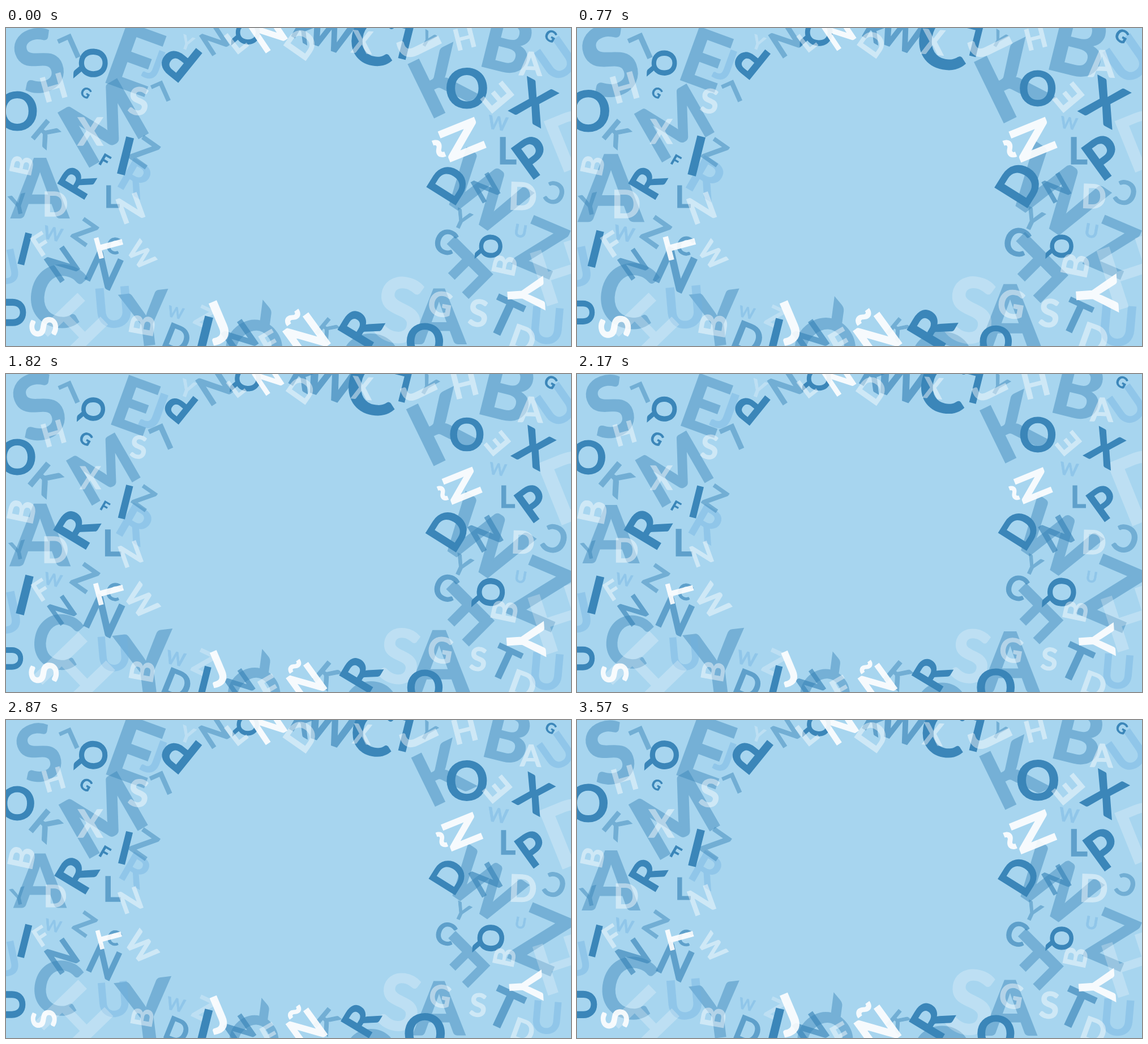
Animation, 998 px wide and 561 px high, one loop 3640 ms. Source, as an HTML page:

```html
<!DOCTYPE html>
<html lang="en">
<head>
<meta charset="utf-8">
<title>Breathing letters</title>
<style>
html, body { margin: 0; overflow: hidden; background: #a7d5ef; }
svg { display: block; width: 998px; height: 561px; }
text { font: 700 135.5px Lato, sans-serif; text-anchor: middle; stroke-width: 3px; }
</style>
</head>
<body>
<svg id="stage" viewBox="0 0 998 561"></svg>
<script>
const LOOP = 3640, STEP = 70, SWELL = 0.115;
const NAVY = '#3985b8', SKY = '#6fb1e2', WHITE = '#fff';
const stage = document.getElementById('stage');
const ruler = document.createElement('canvas').getContext('2d');
ruler.font = '700 135.5px Lato, sans-serif';
ruler.textAlign = 'center';
const letters = [];

// Horizontal shift that puts the middle of the inked shape at zero
function inkShift(char) {
  const { actualBoundingBoxLeft: left, actualBoundingBoxRight: right } = ruler.measureText(char);
  return (left - right) / 2;
}

// Row: letter, centre x, centre y, cap height, angle, time of largest size (% of the loop)
function layer(color, opacity, rows) {
  for (const [char, x, y, height, angle, peak] of rows) {
    const node = document.createElementNS('http://www.w3.org/2000/svg', 'text');
    node.textContent = char;
    const looks = { x: inkShift(char), y: 48.5, fill: color, stroke: color, opacity };
    for (const name in looks) node.setAttribute(name, looks[name]);
    stage.append(node);
    letters.push({ node, x, y, height, angle, peak: peak / 100 });
  }
}

// Large translucent blue
layer(NAVY, 0.45, [
  ['S', 57, 58, 113, -20, 28],
  ['E', 229, 56, 103, 20, 92],
  ['M', 172, 168, 101, -30, 92],
  ['A', 60, 284, 107, 0, 27],
  ['C', 91, 472, 102, 12, 15],
  ['Y', 248, 513, 104, -7, 60],
  ['K', 774, 92, 108, -26, 28],
  ['B', 888, 29, 103, 14, 30],
  ['W', 845, 293, 103, 34, 28],
  ['Z', 945, 387, 103, 23, 60],
  ['F', 805, 422, 97, 135, 28],
  ['A', 765, 509, 106, 0, 36],
  ['Q', 437, 562, 92, 230, 20],
  ['D', 645, 585, 98, -90, 20]
]);

// Soft blue
layer(SKY, 0.4, [
  ['J', 260, 64, 60, 20, 55],
  ['R', 231, 266, 60, 30, 30],
  ['U', 190, 493, 66, -5, 15],
  ['J', 5, 421, 64, -12, 40],
  ['U', 973, 56, 64, -35, 25],
  ['U', 955, 525, 64, 5, 25],
  ['W', 83, 363, 23, 12, 20],
  ['W', 300, 502, 22, 12, 60],
  ['W', 869, 168, 23, 8, 85],
  ['U', 909, 358, 22, 10, 20]
]);

// Medium blue, faint
layer(NAVY, 0.48, [
  ['N', 368, 22, 48, -33, 45],
  ['L', 111, 35, 42, 156, 20],
  ['L', 273, 114, 42, 156, 55],
  ['K', 71, 188, 46, 40, 60],
  ['Z', 244, 219, 44, 35, 92],
  ['Z', 139, 360, 44, 35, 30],
  ['Y', 22, 311, 33, -12, 20],
  ['Y', 745, 20, 30, 30, 55],
  ['Y', 805, 338, 34, 25, 30],
  ['C', 969, 291, 44, 200, 50],
  ['K', 568, 533, 38, 40, 60]
]);

// Medium blue, strong
layer(NAVY, 0.65, [
  ['L', 189, 298, 43, 0, 60],
  ['L', 887, 217, 44, 0, 10],
  ['N', 99, 417, 46, -35, 90],
  ['N', 173, 427, 60, 25, 30],
  ['C', 191, 384, 30, 20, 30],
  ['N', 847, 282, 47, -30, 60],
  ['C', 777, 377, 45, 20, 30],
  ['T', 881, 510, 62, 25, 85],
  ['D', 303, 548, 47, 22, 30],
  ['N', 413, 548, 48, -35, 10],
  ['W', 572, 12, 58, 20, 60],
  ['K', 527, 6, 42, 30, 60]
]);

// Large pale
layer(WHITE, 0.25, [
  ['S', 695, 498, 106, 8, 12],
  ['D', 1008, 194, 106, -22, 60],
  ['H', 980, 432, 101, -18, 30],
  ['H', 120, 527, 100, 46, 60],
  ['Z', 350, 510, 40, 25, 60],
  ['Y', 320, 26, 27, 20, 60]
]);

// Solid blue
layer(NAVY, 0.98, [
  ['Q', 154, 63, 45, 92, 91],
  ['O', 20, 147, 65, 0, 19],
  ['I', 211, 226, 63, 14, 17],
  ['R', 126, 270, 61, -59, 60],
  ['I', 33, 390, 63, 14, 43],
  ['P', 307, 55, 61, -141, 91],
  ['U', 6, 502, 52, -90, 91],
  ['G', 141, 114, 20, 30, 60],
  ['F', 175, 234, 20, 30, 91],
  ['Q', 427, 9, 43, 92, 30],
  ['C', 649, 20, 96, 10, 34],
  ['L', 695, 20, 59, 194, 88],
  ['O', 814, 107, 64, 0, 91],
  ['X', 932, 131, 66, 28, 17],
  ['P', 932, 226, 64, -36, 16],
  ['D', 783, 274, 62, -58, 28],
  ['Q', 856, 386, 44, 92, 60],
  ['R', 628, 527, 64, -59, 20],
  ['O', 740, 553, 62, 0, 77],
  ['I', 350, 544, 63, 14, 95],
  ['G', 962, 14, 21, 30, 30]
]);

// Translucent white
layer(WHITE, 0.45, [
  ['H', 84, 105, 43, -16, 20],
  ['S', 234, 129, 45, 6, 91],
  ['X', 149, 183, 45, 0, 91],
  ['B', 28, 242, 43, -78, 60],
  ['D', 88, 311, 45, 0, 28],
  ['N', 220, 318, 43, -20, 14],
  ['F', 63, 381, 37, -33, 20],
  ['W', 239, 401, 38, 50, 60],
  ['B', 241, 524, 43, -80, 25],
  ['E', 468, 556, 44, -30, 30],
  ['L', 407, 23, 37, -38, 91],
  ['D', 522, 27, 45, -55, 85],
  ['X', 629, 25, 40, 5, 25],
  ['J', 729, 27, 66, 64, 10],
  ['H', 810, 18, 42, -14, 60],
  ['A', 927, 63, 44, 2, 30],
  ['E', 868, 122, 46, -130, 5],
  ['D', 914, 297, 45, 2, 91],
  ['B', 881, 418, 43, -78, 30],
  ['S', 834, 503, 45, 5, 15],
  ['G', 767, 487, 45, 10, 28],
  ['D', 914, 549, 45, 20, 28]
]);

// Bright white
layer(WHITE, 0.9, [
  ['Ñ', 463, 9, 50, -34, 91],
  ['Ñ', 806, 197, 63, -112, 11],
  ['Ñ', 531, 546, 62, -36, 13],
  ['Y', 918, 470, 66, 86, 28],
  ['T', 183, 383, 48, -105, 28],
  ['S', 67, 528, 50, -98, 28],
  ['J', 370, 521, 66, -23, 11]
]);

function draw(now) {
  const time = Math.floor((now % LOOP) / STEP) * STEP / LOOP;
  for (const { node, x, y, height, angle, peak } of letters) {
    const swell = 1 + SWELL * Math.cos(2 * Math.PI * (time - peak));
    node.setAttribute('transform',
      `translate(${x} ${y}) rotate(${angle}) scale(${height * swell / 100})`);
  }
  requestAnimationFrame(() => draw(performance.now()));
}
draw(0);
</script>
</body>
</html>
```
